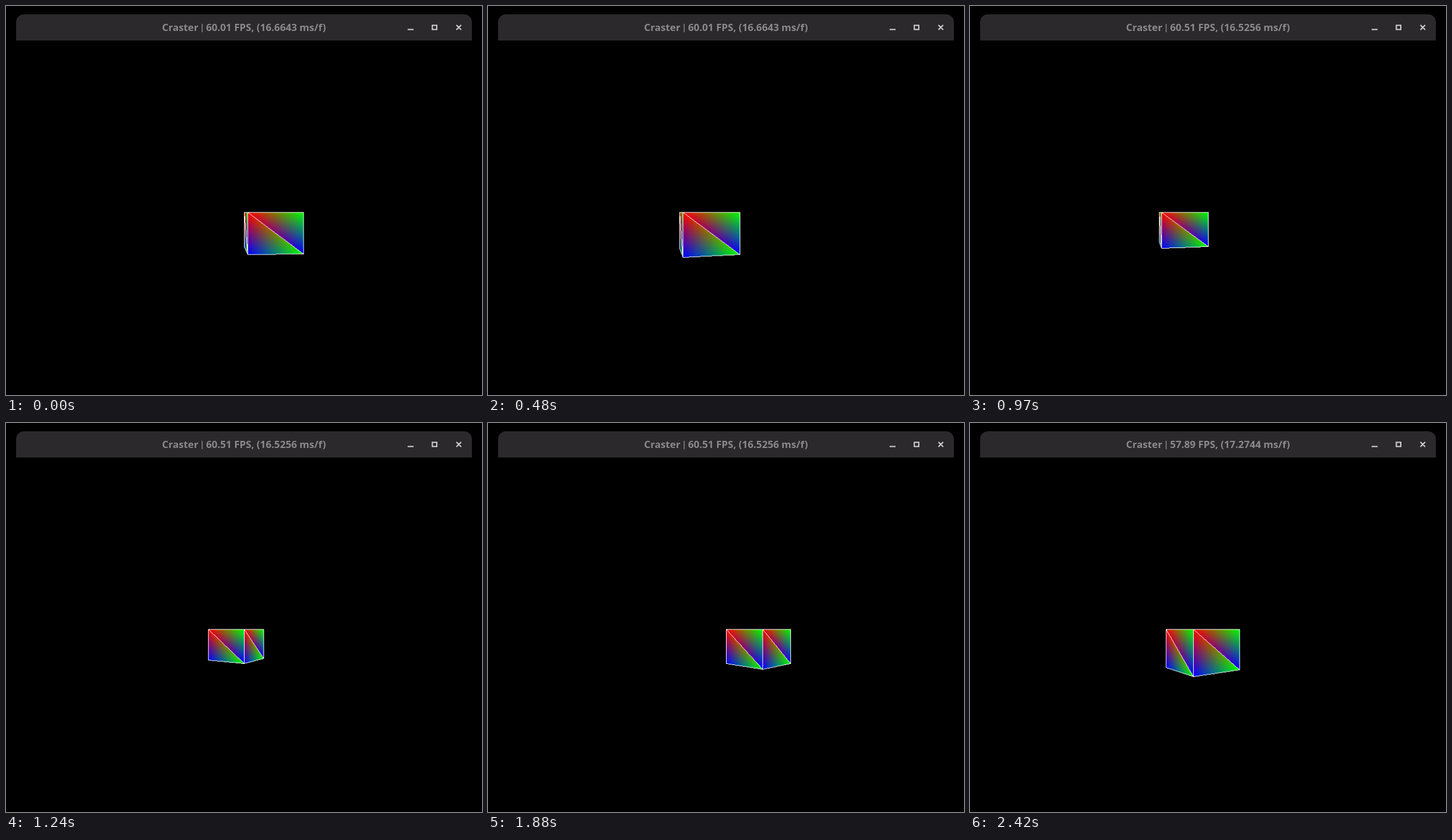
Animation, 800 px wide and 654 px high, one loop 2450 ms. Source, as an HTML page with a canvas:

```html
<!DOCTYPE html>
<html lang="en">
<head>
<meta charset="utf-8">
<title>Craster</title>
<style>
  html, body { margin: 0; width: 100%; height: 100%; overflow: hidden; background: #000; }
  svg, canvas { position: absolute; left: 0; top: 0; }
  canvas { left: 17px; top: 59px; width: 766px; height: 574.5px; }
  text { font: bold 16.7px "Noto Sans", "Open Sans", sans-serif; fill: #8a898b; text-anchor: middle; }
  .bar { font-family: Roboto, sans-serif; }
</style>
</head>
<body>
<svg width="800" height="654">
  <path d="M17 58V27a13 13 0 0 1 13-13H770a13 13 0 0 1 13 13V58Z" fill="#2b292c"/>
  <text x="400" y="42">Craster <tspan class="bar">|</tspan> <tspan id="rate"></tspan></text>
  <g fill="none" stroke="#d2d1d3" stroke-width="2">
    <path d="M675 39.5h10M716.5 32.5h7.5v7h-7.5zM757 32l8 8m0-8l-8 8"/>
  </g>
</svg>
<canvas id="view" width="800" height="600"></canvas>
<script>
const LOOP = 2450;
const LEFT = 275, TOP = 295, WIDTH = 250, HEIGHT = 95;
const CENTER_X = 400, CENTER_Y = 300, DEPTH = 5;

// [step, direction of the cube's diagonal in degrees]
const TURN = [[0, 48.7], [9, 0.2], [23, -71.5], [32, -120.4], [49, -205.7], [62, -271.5], [80, -369.4]];

const rateLabel = document.getElementById('rate');
const ctx = document.getElementById('view').getContext('2d');
const image = ctx.createImageData(WIDTH, HEIGHT);

function setPixel(x, y, r, g, b) {
  image.data.set([r, g, b, 255], ((y - TOP) * WIDTH + x - LEFT) * 4);
}

function fillTriangle([a, b, c]) {
  const cross = (p, q, x, y) => (q.x - p.x) * (y - p.y) - (q.y - p.y) * (x - p.x);
  const area = cross(a, b, c.x, c.y);
  if (!area) return;
  const xs = [a.x, b.x, c.x], ys = [a.y, b.y, c.y];
  for (let y = Math.min(...ys); y <= Math.max(...ys); y++) {
    for (let x = Math.min(...xs); x <= Math.max(...xs); x++) {
      const red = cross(b, c, x, y) / area;
      const green = cross(c, a, x, y) / area;
      const blue = 1 - red - green;
      if (Math.min(red, green, blue) > -1e-6) setPixel(x, y, red * 255, green * 255, blue * 255);
    }
  }
}

function drawLine(p, q) {
  const steps = Math.max(Math.abs(q.x - p.x), Math.abs(q.y - p.y), 1);
  for (let i = 0; i <= steps; i++) {
    const k = i / steps;
    setPixel(Math.round(p.x + (q.x - p.x) * k), Math.round(p.y + (q.y - p.y) * k), 255, 255, 255);
  }
}

function project(radius, degrees) {
  const angle = degrees * Math.PI / 180;
  const z = DEPTH - radius * Math.cos(angle);
  const x = CENTER_X + CENTER_X * radius * Math.sin(angle) / z;
  const corner = y => ({ x: Math.floor(x), y: Math.floor(y) });
  return { x, top: corner(CENTER_Y), bottom: corner(CENTER_Y + CENTER_Y / z) };
}

function drawCube(angle) {
  image.data.fill(0);
  // The cube turns about one of its vertical edges.
  const edges = [project(0, 0), project(1, angle - 45), project(Math.SQRT2, angle), project(1, angle + 45)];
  const triangles = [];
  edges.forEach((l, i) => {
    const r = edges[(i + 1) % 4];
    if (l.x < r.x) triangles.push([l.top, r.top, r.bottom], [l.top, r.bottom, l.bottom]);
  });
  triangles.forEach(fillTriangle);
  for (const t of triangles) t.forEach((p, i) => drawLine(p, t[(i + 1) % 3]));
  ctx.putImageData(image, LEFT, TOP);
}

// Steps last 30 ms, two of them 40 ms.
function stepAt(t) {
  const pause = t < 420 ? 0 : t < 1510 ? 10 : 20;
  return Math.min(80, Math.floor((t - pause) / 30));
}

function angleAt(step) {
  const i = Math.max(1, TURN.findIndex(([end]) => step <= end));
  const [s0, a0] = TURN[i - 1], [s1, a1] = TURN[i];
  return a0 + (a1 - a0) * (step - s0) / (s1 - s0);
}

function render() {
  const t = performance.now() % LOOP;
  const rate = t < 940 ? '60.01 FPS, (16.6643' : t < 1940 ? '60.51 FPS, (16.5256' : '57.89 FPS, (17.2744';
  rateLabel.textContent = `${rate} ms/f)`;
  drawCube(angleAt(stepAt(t)));
  requestAnimationFrame(render);
}
render();
</script>
</body>
</html>
```
